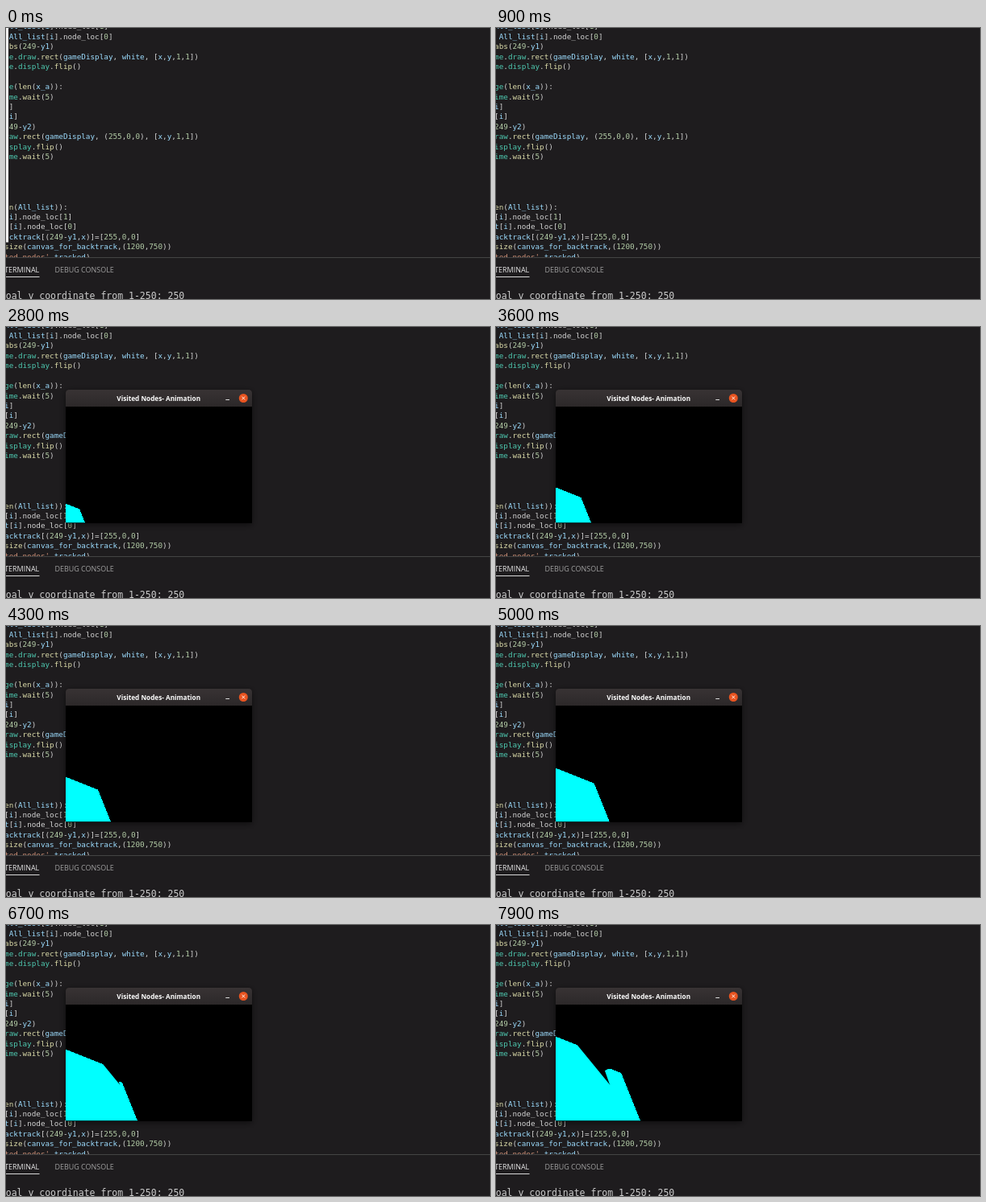
An HTML page for the animation above (8000 ms loop, 600 by 337 pixels).

```html
<!DOCTYPE html>
<html lang="en">
<head>
<meta charset="utf-8">
<title>Visited Nodes</title>
<style>
  html, body { margin: 0; width: 100%; height: 100%; overflow: hidden; background: #1e1c1e; }
  svg { display: block; width: 100vw; height: 100vh; }
  text { white-space: pre; }
  .mono { font-family: "DejaVu Sans Mono", monospace; font-size: 9.3px; fill: #d4d4d4; }
  .ui { font-family: "Open Sans", sans-serif; font-size: 8.95px; }
  .module { fill: #4ec9b0; }
  .call { fill: #dcdcaa; }
  .number { fill: #b5cea8; }
  .string { fill: #ce9178; }
  .name { fill: #9cdcfe; }
</style>
</head>
<body>
<svg viewBox="0 0 600 337" preserveAspectRatio="none">
  <defs>
    <linearGradient id="bar" x2="0" y2="1">
      <stop stop-color="#383334"/>
      <stop offset="1" stop-color="#2c2829"/>
    </linearGradient>
    <filter id="shadow" x="-20%" y="-20%" width="140%" height="150%">
      <feDropShadow dx="0" dy="2" stdDeviation="4" flood-color="#000" flood-opacity=".55"/>
    </filter>
    <clipPath id="direct"><path d="M0 0V127L67 45L150 128V0Z"/></clipPath>
    <clipPath id="around"><path d="M67 45L46 105H150V45Z"/></clipPath>
  </defs>

  <rect width="600" height="337" fill="#1e1c1e"/>
  <g id="code" class="mono"></g>

  <rect y="285" width="600" height="52" fill="#1e1c1e"/>
  <rect y="285" width="600" height="1" fill="#444"/>
  <text class="ui" x="41.2" y="304" text-anchor="end" fill="#e7e7e7">TERMINAL</text>
  <rect y="309" width="41.5" height="1" fill="#d8d8d8"/>
  <text class="ui" x="60.5" y="304" fill="#a0a0a0">DEBUG CONSOLE</text>
  <text class="mono" x="-.3" y="337.3" style="font-size:11.5px;fill:#ccc">oal y coordinate from 1-250: 250</text>

  <rect id="edge" width="3" height="266.5" fill="#f2f1f0"/>

  <g id="window">
    <path d="M74 244V82Q74 78 78 78H301Q305 78 305 82V244Z" filter="url(#shadow)"/>
    <path d="M74 99V82Q74 78 78 78H301Q305 78 305 82V99Z" fill="url(#bar)"/>
    <text class="ui" x="189.2" y="91.6" text-anchor="middle" fill="#fff" style="font-size:8.2px;font-weight:700">Visited Nodes- Animation</text>
    <path d="M272.3 90.5H277" stroke="#ddd"/>
    <circle cx="294.3" cy="88.5" r="5.5" fill="#e95420"/>
    <path d="M292.4 86.6l3.8 3.8m0-3.8l-3.8 3.8" stroke="#fff" stroke-width=".9"/>
    <g transform="translate(74 243.5) scale(1 -1)" fill="#0ff" shape-rendering="crispEdges">
      <g clip-path="url(#direct)"><polygon id="wave"/></g>
      <g clip-path="url(#around)"><polygon id="bend"/></g>
    </g>
  </g>
</svg>
<script>
const LOOP = 8000, STEP = 100, EDGE_GONE = 400, WINDOW_OPENS = 2300;
const CORNER = { x: 67, y: 45 };            // obstacle vertex the wave bends around
const CORNER_DISTANCE = CORNER.x + 0.4 * CORNER.y;
const GROWTH = [[2460, 0], [2800, 24], [4300, 56], [5600, 75], [6700, 89], [7900, 105], [8000, 106.2]];

const LINES = [
  "All_list[i].node_loc[1]",
  " All_list[i].node_loc[0]",
  "abs(249-y1)",
  "me.draw.rect(gameDisplay, white, [x,y,1,1])",
  "me.display.flip()",
  "",
  "ge(len(x_a)):",
  "ime.wait(5)",
  "i]",
  "[i]",
  "249-y2)",
  "raw.rect(gameDisplay, (255,0,0), [x,y,1,1])",
  "isplay.flip()",
  "ime.wait(5)",
  "", "", "", "",
  "en(All_list)):",
  "[i].node_loc[1]",
  "t[i].node_loc[0]",
  "acktrack[(249-y1,x)]=[255,0,0]",
  "size(canvas_for_backtrack,(1200,750))",
  "ted_nodes',tracked)"
];
const TOKEN = /(?<string>^ted_nodes')|(?<module>\b(?:me|ime|ge|draw|raw|display|isplay)\b)|(?<call>\b[a-z]+(?=\())|(?<number>\b\d+\b)|(?<attribute>\bnode_loc\b)|(?<name>[A-Za-z_]\w*)/g;

const el = id => document.getElementById(id);

function highlight(line) {
  return line.replace(TOKEN, (word, ...rest) => {
    const groups = rest.at(-1);
    const kind = Object.keys(groups).find(key => groups[key]);
    return `<tspan class="${kind}">${word}</tspan>`;
  });
}

el("code").innerHTML = LINES
  .map((line, i) => `<text x="-1.9" y="${1.4 + 12.45 * i}">${highlight(line)}</text>`)
  .join("");

// The visited area grows steadily, so the radius is interpolated by its square.
function radiusAt(t) {
  const next = GROWTH.findIndex(([time]) => time > t);
  if (next < 1) return 0;
  const [t0, r0] = GROWTH[next - 1], [t1, r1] = GROWTH[next];
  return Math.sqrt(r0 * r0 + (r1 * r1 - r0 * r0) * (t - t0) / (t1 - t0));
}

function octagon(cx, cy, r) {
  return Array.from({ length: 8 }, (_, i) => {
    const a = i * Math.PI / 4, reach = i % 2 ? r * 1.01 : r;
    return `${cx + reach * Math.cos(a)},${cy + reach * Math.sin(a)}`;
  }).join(" ");
}

function show(id, visible) {
  el(id).setAttribute("visibility", visible ? "visible" : "hidden");
}

function render(now) {
  const t = Math.floor(now % LOOP / STEP) * STEP;
  const r = radiusAt(t);
  show("edge", t < EDGE_GONE);
  show("window", t >= WINDOW_OPENS);
  el("wave").setAttribute("points", octagon(0, 0, r));
  el("bend").setAttribute("points", octagon(CORNER.x, CORNER.y, Math.max(0, r - CORNER_DISTANCE)));
}

const start = performance.now();
function tick() {
  render(performance.now() - start);
  requestAnimationFrame(tick);
}
tick();
</script>
</body>
</html>
```
